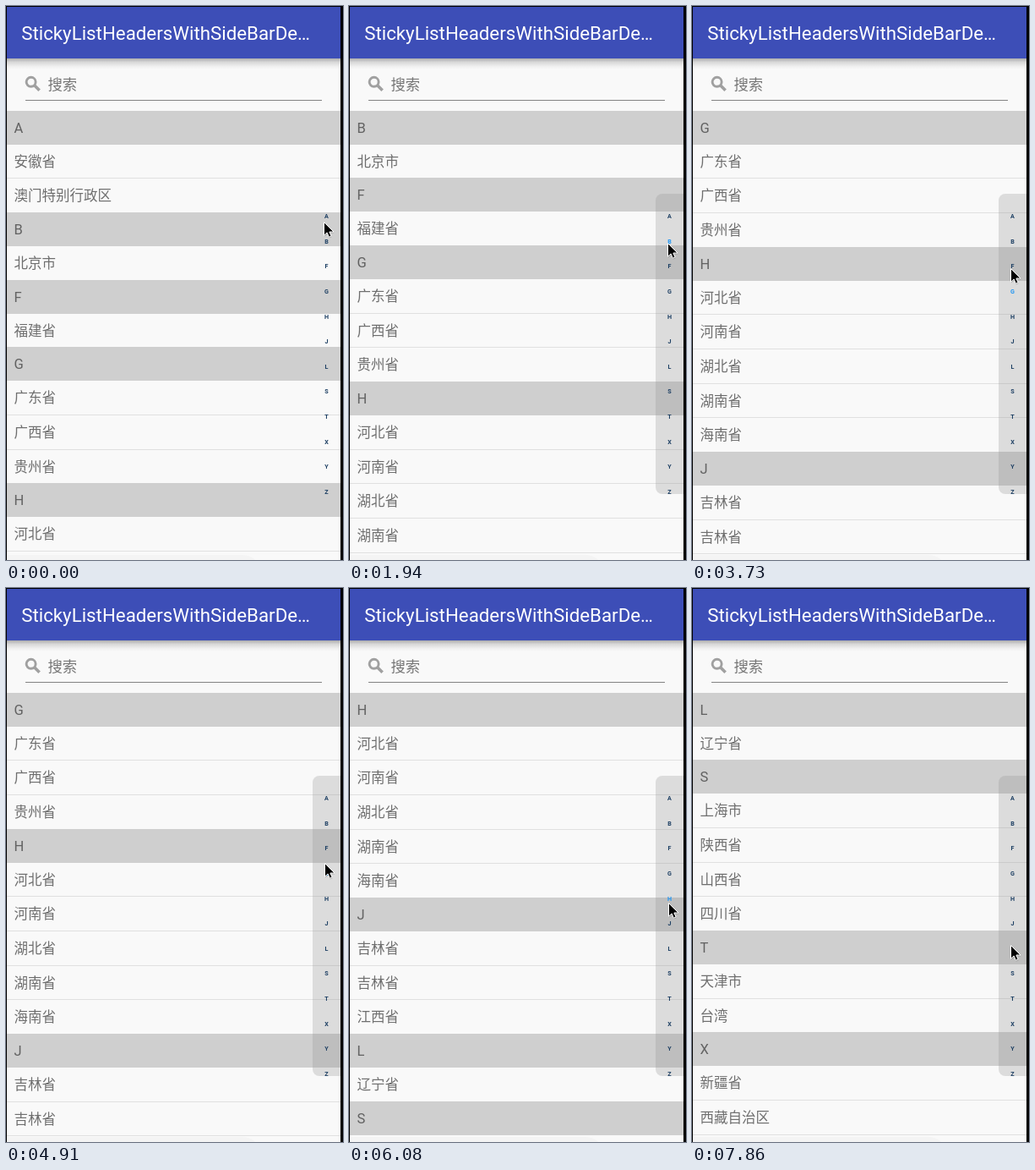
Animation, 399 px wide and 655 px high, one loop 8 s. Source, as an HTML page:

```html
<!DOCTYPE html>
<html lang="zh-CN">
<head>
<meta charset="utf-8">
<style>
html, body { margin: 0; width: 100%; height: 100%; overflow: hidden; background: #000; }
body { position: relative; font-family: Roboto, "Noto Sans CJK SC", "Noto Sans CJK", sans-serif; }
body *, #app { position: absolute; box-sizing: border-box; white-space: nowrap; }
#app { left: 1px; top: 1px; width: 395px; height: 654px; background: #f9f9f9; overflow: hidden; }
#bar { left: 0; top: 0; width: 395px; height: 61px; background: #3d4eb7; color: #fff;
  font-size: 22.3px; line-height: 62px; padding-left: 17.2px; }
#shade { left: 0; top: 61px; width: 395px; height: 13px;
  background: linear-gradient(rgba(0,0,0,.3), rgba(0,0,0,.13) 35%, rgba(0,0,0,.03) 75%, transparent); }
#icon { left: 21px; top: 81px; }
#hint { left: 48.4px; top: 80px; font-size: 17.4px; line-height: 24px; color: #777; }
#line { left: 22px; top: 110px; width: 351px; height: 1px; background: #838383; }
#view { left: 0; top: 123px; width: 395px; height: 531px; overflow: hidden; }
#list { left: 0; width: 395px; }
.row { left: 0; width: 395px; height: 39.84px; line-height: 42.8px; padding-left: 8.5px;
  font-size: 16.5px; color: #6e6e6e; }
.head { background: #cfcfcf; color: #626262; }
.rule { height: 40.67px; border-top: 1px solid #e0e0e0; }
#foot { left: 0; top: 648px; width: 300px; height: 20px; background: rgba(0,0,0,.018); border-radius: 0 20px 0 0; }
#side { left: 362px; top: 221px; width: 33px; height: 355px; border-radius: 8px 0 0 8px; }
#side.on { background: rgba(150,150,150,.29); }
#side b { left: 0; width: 33px; text-align: center; font-size: 7.2px; line-height: 10px; color: #1d3f63; }
#side b.sel { color: #2196f3; }
#cursor { left: 0; top: 0; overflow: visible; }
</style>
</head>
<body>
<div id="app">
  <div id="view"><div id="list"></div></div>
  <div id="foot"></div>
  <div id="bar">StickyListHeadersWithSideBarDe…</div>
  <div id="shade"></div>
  <svg id="icon" width="22" height="22" fill="none" stroke="#a0a0a0">
    <circle cx="7.6" cy="7.8" r="5.5" stroke-width="2.9"/>
    <path d="M11.6 11.8L17.6 17.8" stroke-width="3.6"/>
  </svg>
  <div id="hint">搜索</div>
  <div id="line"></div>
  <div id="side"></div>
</div>
<svg id="cursor" width="14" height="20">
  <path d="M1 2V17.6L4.6 14.4L6.8 19.4L9.6 18.2L7.4 13.6H12.4Z" fill="#000" opacity=".18"/>
  <path d="M.5 .6V16.2L4.1 12.9L6.4 18.2L9.1 17L6.9 12H12Z" fill="#000" stroke="#fff" stroke-width="1"/>
</svg>
<script>
const LOOP = 8000, ROW = 39.84, RULE = 0.83, PITCH = 29.64, OFFSET = 0.3;
const sections = {
  A: '安徽省 澳门特别行政区', B: '北京市', F: '福建省', G: '广东省 广西省 贵州省',
  H: '河北省 河南省 湖北省 湖南省 海南省', J: '吉林省 吉林省 江西省', L: '辽宁省',
  S: '上海市 陕西省 山西省 四川省', T: '天津市 台湾', X: '新疆省 西藏自治区 香港特别行政区',
  Y: '云南省', Z: '浙江省'
};
// Bursts of pointer movement: start, end, number of intervals
const bursts = [[600, 3730, 21], [4480, 6670, 15], [7120, 7560, 3], [7860, 7860, 1]];
// Pointer path: time, x, y
const path = [
  [451, 376, 254.5], [1940, 377, 280], [2690, 380, 292.5], [3730, 377, 309.5],
  [4334, 377, 309.5], [5940, 378, 367], [6670, 378, 394], [7120, 378, 395],
  [7560, 377, 421], [7860, 377, 422]
];
// Times at which the list jumps to the next section
const jumps = [745, 2085, 3575, 5205, 6085, 7265];

const $ = id => document.getElementById(id);
const list = $('list'), side = $('side'), cursor = $('cursor');
const tops = [], letters = [];

function add(parent, tag, cls, text, y) {
  const el = document.createElement(tag);
  el.className = cls;
  el.textContent = text;
  el.style.top = y + 'px';
  parent.append(el);
  return el;
}

let y = 0;
Object.entries(sections).forEach(([letter, names], i) => {
  tops.push(y);
  add(list, 'div', 'row head', letter, y);
  y += ROW;
  names.split(' ').forEach((name, n) => {
    add(list, 'div', n ? 'row rule' : 'row', name, y);
    y += n ? ROW + RULE : ROW;
  });
  letters.push(add(side, 'b', '', letter, 22 + i * PITCH));
});

function stepTime(t) {
  let q = 0;
  for (const [start, end, n] of bursts) {
    if (t < start) break;
    const d = (end - start) / n || 1;
    q = Math.min(end, start + Math.floor((t - start + 6) / d) * d);
  }
  return q;
}

function pointer(q) {
  const i = path.findIndex(p => p[0] > q);
  if (i === 0) return path[0].slice(1);
  if (i < 0) return path[path.length - 1].slice(1);
  const a = path[i - 1], b = path[i], k = (q - a[0]) / (b[0] - a[0]);
  return [a[1] + (b[1] - a[1]) * k, a[2] + (b[2] - a[2]) * k];
}

let shown = -1;
function select(i) {
  if (i === shown) return;
  shown = i;
  list.style.top = -tops[i] - OFFSET + 'px';
  side.classList.toggle('on', i > 0);
  letters.forEach((el, n) => el.classList.toggle('sel', i > 0 && n === i));
}

function draw(now) {
  const t = now % LOOP;
  const [cx, cy] = pointer(stepTime(t));
  cursor.style.transform = `translate(${Math.round(cx)}px, ${Math.round(cy)}px)`;
  select(jumps.filter(j => t >= j).length);
}

let origin;
function tick(now) {
  origin ??= now;
  draw(now - origin);
  requestAnimationFrame(tick);
}
draw(0);
requestAnimationFrame(tick);
</script>
</body>
</html>
```
